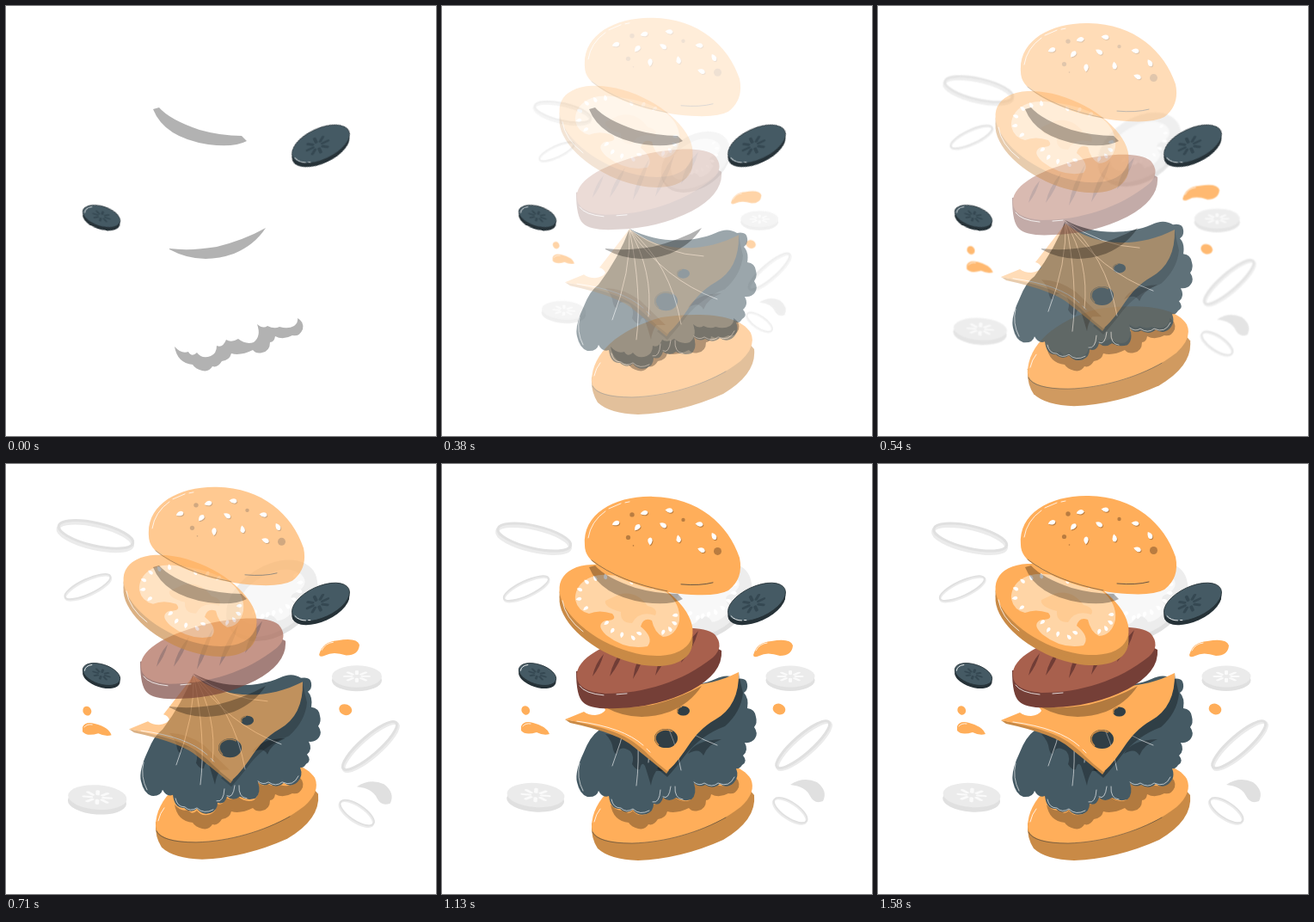
An HTML page for the animation above (1.62 s loop, 500 by 500 pixels).

```html
<!DOCTYPE html>
<html lang="en">
<head>
<meta charset="utf-8">
<title>Exploded burger</title>
<style>
  html, body { margin: 0; width: 100%; height: 100%; overflow: hidden; background: #fff; }
  svg { display: block; width: 100%; height: 100%; }
  .bun { fill: #ffae5a; }
  .crust { fill: #c98a46; }
  .shade { fill: #000; fill-opacity: .3; }
  .leaf { fill: #455a64; }
  .dark { fill: #263238; }
  .pale { fill: #ffd5a6; }
  .grey { fill: #e0e0e0; }
  .light { fill: #ebebeb; }
  .line { fill: none; stroke: #fff; stroke-width: .8; stroke-linecap: round; }
  .ink { fill: none; stroke: #263238; stroke-width: .7; stroke-linecap: round; }
  .ring { fill: none; stroke: #e0e0e0; }
  .ring.low { stroke: #ebebeb; }
</style>
</head>
<body>
<svg viewBox="0 0 500 500">
  <defs>
    <path id="petals" fill="none" stroke-linecap="round" stroke-width="3.2"
      d="M5 0H11M-5 0H-11M0 5V11M0-5V-11M4 4L8 8M-4 4L-8 8M4-4L8-8M-4-4L-8-8"/>
    <path id="seed" d="M-4.5 0Q-1-3.4 2.2-2.5Q4.6-1.5 4.5.4Q3.8 2.8 1 2.7Q-2 2.4-4.5 0Z"/>
  </defs>

  <g data-move="zoom" data-time="1">
    <g transform="translate(107 86) rotate(13)">
      <ellipse class="ring low" cy="2" rx="43.5" ry="13" stroke-width="4"/>
      <ellipse class="ring" cy="-1" rx="43.5" ry="13" stroke-width="3"/>
    </g>
    <g transform="translate(98 145) rotate(-25)">
      <ellipse class="ring low" cy="1" rx="28.5" ry="8.5" stroke-width="2.4"/>
      <ellipse class="ring" cy="-.5" rx="28.5" ry="8.5" stroke-width="1.8"/>
    </g>
    <g transform="translate(420 326.5) rotate(-41)">
      <ellipse class="ring low" cy="1.5" rx="40" ry="10.5" stroke-width="4"/>
      <ellipse class="ring" cy="-.5" rx="40" ry="10.5" stroke-width="3"/>
    </g>
    <g transform="translate(405 403) rotate(34)">
      <ellipse class="ring low" cy="1" rx="22.5" ry="9" stroke-width="2.4"/>
      <ellipse class="ring" cy="-.5" rx="22.5" ry="9" stroke-width="1.8"/>
    </g>
    <g transform="translate(405 247)">
      <ellipse class="grey" cy="4.5" rx="28.5" ry="12.5"/>
      <ellipse class="light" rx="28.5" ry="12.5"/>
      <use href="#petals" stroke="#fafafa" transform="scale(1.25 .55)"/>
    </g>
    <g transform="translate(109 385) rotate(4)">
      <ellipse class="grey" cy="5.5" rx="33.5" ry="14"/>
      <ellipse class="light" rx="33.5" ry="14"/>
      <use href="#petals" stroke="#fafafa" transform="scale(1.4 .65)"/>
    </g>
    <path class="grey" d="M405 373Q420 363 436 370Q449 380 443 392Q433 396 428 386Q423 375 405 373Z"/>
    <path class="bun" d="M362 222Q366 207 383 206Q405 202 408 211Q407 223 393 223Q378 218 369 223Q362 226 362 222Z"/>
    <path class="bun" d="M92 305Q95 298 106 301Q122 305 125 314Q118 316 110 312Q97 316 92 310Z"/>
    <ellipse class="bun" cx="392" cy="285" rx="7.5" ry="6.2" transform="rotate(20 392 285)"/>
    <ellipse class="bun" cx="97" cy="286.500" rx="4.700" ry="5.400" transform="rotate(-30 97 286)"/>
    <path class="line" d="M365 217Q369 209 378 208M94 305Q97 301 103 302"/>
    <g transform="translate(308 158) rotate(-33)">
      <ellipse class="grey" cx="-2" cy="4" rx="57" ry="38"/>
      <ellipse fill="#ededed" rx="57" ry="37"/>
      <path fill="#f8f8f8" d="M-42 0Q-35-26-5-27Q32-28 43-5Q46 10 28 10Q16 5 18 22Q5 31-9 25Q-8 10-24 15Q-40 15-42 0Z"/>
    </g>
    <g id="whiteSeeds" fill="#fff"></g>
  </g>

  <g data-move="up" data-time="1">
    <path class="crust" d="M174 418Q173 435 181 447Q195 460 228 461Q278 459 327 437Q366 414 363 385L350 370L190 400Z"/>
    <path class="bun" d="M174 422C174 390 205 362 255 348C300 342 345 344 359 366Q366 382 347 399C315 424 265 441 221 441Q174 440 174 422Z"/>
    <path class="ink" d="M175 428Q181 441 221 441C260 440 300 428 330 411" opacity=".7"/>
    <path class="line" d="M177 416Q179 407 184 401"/>
  </g>

  <path class="shade" d="M196 396Q204 405 212 402Q216 409 222 403Q228 411 238 407Q245 404 245 395Q252 398 256 388Q262 392 270 387Q279 394 288 391Q297 384 292 370Q299 376 304 372Q312 376 318 373Q328 376 335 372Q340 368 339 363Q347 367 345 376Q341 385 333 383Q322 389 313 384Q312 391 307 391Q307 401 298 403Q291 405 287 400Q273 407 262 404Q260 412 251 413Q246 421 240 419Q236 426 228 424Q220 422 217 417Q199 415 196 396Z"/>

  <g data-move="up" data-time="1">
    <path class="leaf" d="M218 245C250 262 290 262 318 250Q332 243 343 250Q354 248 355 256Q356 263 351 266Q357 272 355 284Q364 285 365 294Q367 301 363 306Q368 313 364 319Q360 325 352 324Q357 333 350 339Q356 346 349 350Q346 355 342 354Q346 364 339 371Q331 378 323 372Q315 379 306 373Q299 377 293 371Q297 384 290 390Q281 393 272 388Q264 394 257 388Q254 398 246 395Q246 404 238 407Q228 410 222 402Q215 408 207 401Q196 402 194 386Q187 389 182 380Q180 388 169 387Q160 384 157 370Q154 358 165 335Q172 317 182 310Q206 278 218 245Z"/>
    <path class="dark" opacity=".65" d="M190 314Q210 314 230 328L260 357L249 357Q244 365 243 374Q239 360 236 351Q232 345 230 355Q226 357 221 349Q224 340 219 334Q211 328 206 332Q202 342 199 332Q198 322 190 314ZM286 337Q294 321 325 320Q308 327 304 339Q299 329 286 337Z"/>
    <path class="line" opacity=".75" d="M218 246Q220 295 198 351M218 246Q233 320 226 374M218 246Q246 295 240 347M218 246Q265 285 278 356M218 246Q260 275 304 277M218 246Q258 304 320 327"/>
    <path class="line" opacity=".8" d="M160 348Q156 365 164 380M197 390Q199 400 208 400Q214 406 222 401Q230 409 241 403M245 393Q253 395 254 379M257 387Q264 391 266 375M271 375Q270 389 280 390M293 370Q299 375 305 371Q314 377 321 371Q334 377 340 364"/>
  </g>

  <g data-move="up" data-time="1.6">
    <path class="shade" d="M345 243Q347 256 350 267Q348 289 329 306Q302 316 284 338Q272 354 262 365L250 355L340 270Z"/>
    <path class="crust" d="M143 298L149 302Q205 314 223 330Q248 350 261 361L264 357L250 342L200 308Z"/>
    <path class="bun" fill-rule="evenodd" d="M143 298L165 289Q170 293 178 293Q187 292 190 287Q188 282 183 281L218 236C250 262 300 266 345 243Q346 282 318 298C288 315 285 339 262 358Q250 349 240 339C215 313 190 308 143 298ZM247 320A13.500 11 0 1 0 274 320A13.500 11 0 1 0 247 320ZM273 288A7.500 5.500 0 1 0 288 288A7.500 5.500 0 1 0 273 288Z"/>
    <g class="shade"><ellipse cx="260.500" cy="320" rx="13.500" ry="11"/><ellipse cx="280.500" cy="288" rx="7.500" ry="5.500"/></g>
    <path fill="none" stroke="#c98a46" stroke-width="1.500" d="M252 328Q245 321 250 314Q258 307 268 312M274 290Q272 285 279 283"/>
    <path class="line" d="M157 300Q211 307 234 328M238 332L242 336"/>
  </g>

  <path class="shade" d="M190 282Q215 285 245 280Q277 272 302 258Q289 278 265 288Q225 302 190 283Z"/>

  <g data-move="down" data-time="1.6">
    <path fill="#753f37" d="M156 240Q156 269 164 276Q173 285 204 283Q250 282 290 262Q327 242 325 216L310 208L170 238Z"/>
    <path fill="#a8604d" d="M157 246C155 225 190 207 235 196C270 188 305 187 317 197Q329 211 315 224C280 252 235 266 190 266Q157 263 157 246Z"/>
    <path fill="#713d36" d="M188 220Q184 235 175 246Q178 231 188 220ZM213 211Q207 231 195 246Q198 229 213 211ZM241 201Q234 231 222 249Q225 225 241 201ZM270 197Q263 224 248 245Q252 221 270 197ZM298 193Q292 215 278 230Q282 208 298 193Z"/>
    <path class="line" d="M160 257Q166 266 188 268M203 267L215 266"/>
  </g>

  <g data-move="down" data-time="1.6">
    <g class="crust">
      <ellipse cx="214" cy="181" rx="83" ry="44" transform="rotate(25 214 181)"/>
      <ellipse cx="214" cy="175" rx="83" ry="44" transform="rotate(25 214 175)"/>
    </g>
    <ellipse class="bun" cx="214" cy="169" rx="83" ry="44" transform="rotate(25 214 169)"/>
    <path class="pale" d="M155 157C154 138 172 126 194 128Q235 131 261 148Q278 162 276 181Q272 199 257 200Q247 195 244 181Q234 177 231 188Q247 201 239 211Q214 216 191 198Q178 186 190 181Q205 181 198 173Q183 168 171 173Q158 170 155 157Z"/>
    <path fill="#ffc382" d="M205 151Q225 145 239 164Q252 167 248 175Q229 169 221 184Q207 184 208 171Q188 166 190 158Z" opacity=".55"/>
    <path class="line" d="M140 158Q143 178 164 194"/>
    <g id="tomatoSeeds" fill="#fff"></g>
  </g>

  <path class="shade" d="M171 120L178 118Q190 132 225 144Q250 151 274 151L280 157Q265 165 235 161Q184 153 171 120Z"/>

  <g data-move="down" data-time="1.6">
    <path class="bun" d="M166 94C163 57 201 36 245 37C298 38 333 69 346 108Q351 132 333 146Q320 153 290 151C251 149 209 136 184 119Q166 108 166 94Z"/>
    <path class="ink" d="M174 111Q206 136 262 147" opacity=".7"/>
    <path class="ink" d="M278 139Q300 141 315 137"/>
    <path class="line" d="M170 85Q173 66 190 54M194 51L208 45M213 44L218 43"/>
    <g fill="#b97c40">
      <circle cx="221" cy="58" r="2.700"/><circle cx="216.500" cy="84.500" r="2.600"/>
      <circle cx="280.500" cy="64" r="2.200"/><circle cx="320.500" cy="100.500" r="4.500"/>
      <circle cx="222.500" cy="94" r=".8"/>
    </g>
    <g id="bunSeedShadows" fill="#b97c40" transform="translate(.8 1)"></g>
    <g id="bunSeeds" fill="#fff"></g>
  </g>

  <g transform="translate(366 160.500) rotate(-25)">
    <ellipse class="dark" cx="-2" cy="4" rx="36" ry="18"/>
    <ellipse class="leaf" rx="36" ry="18" stroke="#263238" stroke-width=".8"/>
    <use href="#petals" stroke="#354852" transform="translate(-4 0) scale(1.2 .8)"/>
    <path class="line" d="M-34 2Q-32 9-25 12M-22 13L-20 14"/>
  </g>
  <g transform="translate(111 244.500) rotate(18)">
    <ellipse class="dark" cx="1" cy="3.500" rx="22.500" ry="11.500"/>
    <ellipse class="leaf" rx="22.500" ry="11.500" stroke="#263238" stroke-width=".8"/>
    <use href="#petals" stroke="#354852" transform="scale(.9 .5)"/>
    <path class="line" d="M-20 2Q-21-4-14-7"/>
  </g>
</svg>
<script>
  const LOOP = 1620, FPS = 24;

  // Each seed is x, y, angle.
  function sow(id, seeds, size = 1) {
    document.getElementById(id).innerHTML = seeds.map(([x, y, angle]) =>
      `<use href="#seed" transform="translate(${x} ${y}) rotate(${angle}) scale(${size})"/>`).join('');
  }

  const bunSeeds = [[202, 68, -20], [227, 73, -50], [235, 56, -15], [264, 53, 5], [257, 70, 30],
    [242, 89, -88], [275, 86, 80], [299, 69, 5], [316, 83, 60], [301.5, 99, 20]];
  sow('bunSeeds', bunSeeds);
  sow('bunSeedShadows', bunSeeds);
  sow('tomatoSeeds', [[160, 145, 20], [159, 156, -10], [167, 167, -35], [168, 136, 40], [178, 132, 60],
    [190, 130, 80], [191, 184, -40], [198, 193, -60], [209, 198, -75], [222, 201, 50], [229, 196, 20],
    [257, 195, -70], [265, 191, 60], [270, 184, 30], [271, 175, -5], [220, 136, 60], [234, 138, -60],
    [247, 143, -40]], .75);
  sow('whiteSeeds', [[297, 179, -60], [303, 177, -70], [310, 175, -80], [318, 172, 70], [326, 167, 40],
    [333, 159, 20], [339, 150, 0], [340, 140, -10], [335, 132, -40], [288, 174, -40]], .8);

  // Cubic Bézier easing that overshoots before it settles.
  function ease(x) {
    if (x <= 0) return 0;
    if (x >= 1) return 1;
    const curve = (s, a, b) => 3 * (1 - s) ** 2 * s * a + 3 * (1 - s) * s * s * b + s ** 3;
    let low = 0, high = 1;
    for (let i = 0; i < 24; i++) {
      const mid = (low + high) / 2;
      if (curve(mid, .36, .5) < x) low = mid; else high = mid;
    }
    return curve(low, -.01, 1.38);
  }

  const moves = {
    zoom: e => `translate(250 250) scale(${.5 + e / 2}) translate(-250 -250)`,
    up: e => `translate(0 ${30 * (1 - e)})`,
    down: e => `translate(0 ${-30 * (1 - e)})`
  };
  const parts = [...document.querySelectorAll('[data-move]')];

  function draw(now) {
    const step = Math.floor((now % LOOP + 6) * FPS / 1000);
    const seconds = step < 2 ? 0 : (step + .6) / FPS;
    for (const part of parts) {
      const e = ease(seconds / part.dataset.time);
      part.setAttribute('transform', moves[part.dataset.move](e));
      part.setAttribute('opacity', Math.min(1, Math.max(0, e)));
    }
  }

  const start = performance.now();
  function tick() {
    draw(performance.now() - start);
    requestAnimationFrame(tick);
  }
  tick();
</script>
</body>
</html>
```
